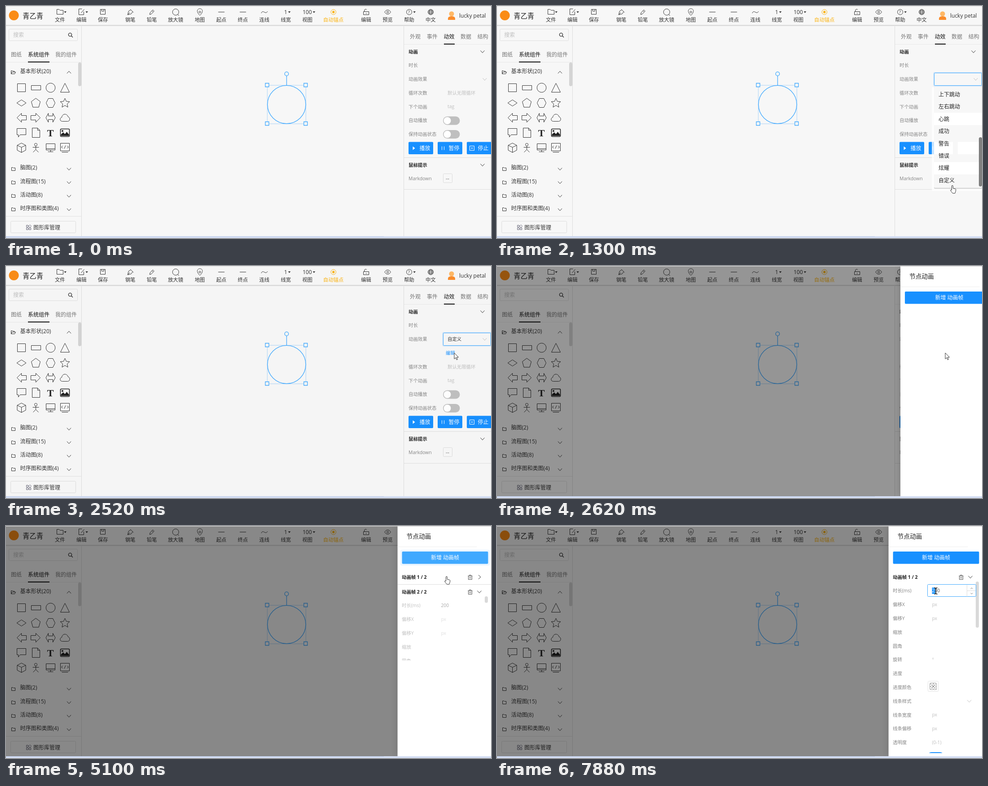
Recreate the animation shown at these times as an HTML page with a canvas. Size 1082x518 px, loop 8 s.

```html
<!DOCTYPE html>
<html lang="zh-CN">
<head>
<meta charset="utf-8">
<style>
html, body { margin: 0; width: 100%; height: 100%; overflow: hidden; background: #f7f7f7; }
canvas { display: block; }
</style>
</head>
<body>
<canvas id="stage" width="1082" height="518"></canvas>
<script>
const g = document.getElementById('stage').getContext('2d');
const LOOP = 8000, BG = '#f7f7f7', BLUE = '#1890ff', SKY = '#40a9ff', INK = '#333', GRAY = '#858585', PALE = '#bfbfbf';
const clamp = v => Math.min(1, Math.max(0, v));
const ramp = (t, start, length) => clamp((t - start) / length);
const smooth = v => v * v * (3 - 2 * v);

function text(s, x, cy, size = 12, color = INK, align = 'left', weight = 400) {
  g.font = `${weight} ${size}px "Open Sans", "Noto Sans CJK SC", "Noto Sans CJK", sans-serif`;
  g.textAlign = align;
  g.fillStyle = color;
  g.fillText(s, x, cy + size * 0.37);
}
function fill(x, y, w, h, color, r = 0) {
  g.fillStyle = color;
  g.beginPath();
  g.roundRect(x, y, w, h, r);
  g.fill();
}
function frame(x, y, w, h, color, r = 2, width = 1) {
  g.strokeStyle = color;
  g.lineWidth = width;
  g.beginPath();
  g.roundRect(x + 0.5, y + 0.5, w, h, r);
  g.stroke();
}
function disc(x, y, r, color) { fill(x - r, y - r, 2 * r, 2 * r, color, r); }
function icon(d, x, y, color = INK, width = 1, inside) {
  const path = new Path2D(d);
  g.save();
  g.translate(x, y);
  if (inside) { g.fillStyle = inside; g.fill(path); }
  if (width) { g.strokeStyle = color; g.lineWidth = width; g.stroke(path); }
  g.restore();
}
const ring = r => `M${r} 0A${r} ${r} 0 1 1 ${-r} 0A${r} ${r} 0 1 1 ${r} 0z`;
const DOWN = 'M-4.5-2.5L0 2.5 4.5-2.5', UP = 'M-4.5 2.5L0-2.5 4.5 2.5', RIGHT = 'M-2-4.5L3 0-2 4.5';
const FOLDER = 'M-4-3h3l1 1h4v6h-8z';
const caret = (x, y) => icon('M-2.5-1.5h5.5L0 2z', x, y, INK, 0, INK);

const tools = [
  ['文件', 120, 'M-7-6h5l2 2h7v9h-14z', 132],
  ['编辑', 168, 'M5-1v7h-11v-13h7M-1 2L6-6', 180],
  ['保存', 216, 'M-6-6h11v11h-11zM-3-6v4h5v-4'],
  ['钢笔', 277, 'M-6 6l2-8 5-3 4 4-3 5zM-6 6l5-5M0-6l7 7'],
  ['铅笔', 325, 'M-5 5.5l1-4 6-6.5 3 3-6.5 6.5zM0-3l3 3'],
  ['放大镜', 378, ring(7) + 'M4.5 5.5l3 2.5'],
  ['地图', 432, 'M0 7.5C-9-1-6-7.5 0-7.5S9-1 0 7.5z' + ring(2)],
  ['起点', 480, 'M-7 0H7'],
  ['终点', 528, 'M-7 0H7'],
  ['连线', 576, 'M-7 2.5C-3-7 2 7 7-1.5'],
  ['线宽', 624, '', 632, '1'],
  ['视图', 672, '', 687, '100'],
  ['自动锚点', 730, ring(5.7)],
  ['编辑', 803, 'M-6-1h12v7h-12zM-4-1v-3a3 3 0 0 1 5-1.5M0 2v2'],
  ['预览', 851, 'M-7 0Q0-10 7 0Q0 10-7 0z' + ring(2)],
  ['帮助', 899, ring(6), 911, '?'],
  ['中文', 947, ring(6) + 'M-6 0H6M0-6C-4-3-4 3 0 6C4 3 4-3 0-6M-5-3H5M-5 3H5'],
];
const shapes = [
  'M-9-9h18v18h-18z', 'M-10-5h21v10h-21z', ring(10.3), 'M0-10L10 10H-10z',
  'M0-7L10.5 0 0 7-10.5 0z', 'M0-10.5L10-3 6.5 9.5H-6.5L-10-3z', 'M-5-10H5L10 0 5 10H-5L-10 0z',
  'M0-10.5L3-3.5 10.5-3 5 2 6.5 9.5 0 5.5-6.5 9.5-5 2-10.5-3-3-3.5z',
  'M-10 0L0-10V-5H11V5H0V10z', 'M10 0L0-10V-5H-11V5H0V10z',
  'M-10.5 0L-5-10V-4H5V-10L10.5 0 5 10V4H-5V10z',
  'M-6 8C-12 8-12 0-7-1C-6-10 5-10 7-2C12-1 12 8 6 8z',
  'M-10-10h20v14h-13l-4 5v-5h-3z', 'M-8-11h12l5 5v16h-17zM4-11v5h5', '', '',
  'M0-10.5L9.5-5.5V5.5L0 10.5-9.5 5.5V-5.5zM-9.5-5.5L0-1 9.5-5.5M0-1V10.5',
  'M3-7A3 3 0 1 1-3-7A3 3 0 1 1 3-7M0-4V4L-6 10M0 4L6 10M-7-1H7',
  'M-10-9h20V5h-20zM-10 2h20M0 5v4M-6 9H6',
  'M-10-10h20V7h-20zM-5-4l-3 2.5 3 2.5M5-4l3 2.5-3 2.5M1.5-5l-3 7M-7 10H7',
];

function toolbar() {
  fill(0, 0, 1082, 43, BG);
  disc(17.5, 21, 11, '#fa8c16');
  text('青乙青', 37, 22, 15.4, '#222');
  for (const [label, x, d, arrow, value] of tools) {
    const color = label === '自动锚点' ? '#fbb415' : INK;
    icon(d, x + 0.5, 13.5, color);
    if (value) text(value, x, 13.5, value === '?' ? 9 : 12, INK, 'center');
    if (arrow) caret(arrow, 13.5);
    text(label, x + 0.3, 31, 11.4, color, 'center');
  }
  disc(730.5, 13.5, 2.7, '#fbb415');
  icon('M-8 9V6Q-8 1 0 1T8 6V9z', 994, 22, '', 0, '#fa8c2b');
  disc(994, 17.5, 5.5, '#ffb866');
  text('lucky petal', 1011, 21.5, 12);
  fill(0, 42, 1082, 1, '#e2e2e2');
  fill(0, 43, 1082, 1, '#d6d6d6');
  fill(0, 44, 1082, 1, '#e8e8e8');
  fill(0, 0, 1082, 1, '#e0e0e0');
}

function sidebar() {
  frame(6, 51, 153, 26, '#dedede');
  text('搜索', 16, 65, 12, PALE);
  icon(ring(3.6) + 'M2.7 2.7L6 6', 143, 64, INK, 1.4);
  text('图纸', 11, 108.5, 12, '#777');
  text('系统组件', 49, 108.5, 12, '#111');
  text('我的组件', 110, 108.5, 12, '#777');
  fill(0, 125, 168, 1, '#e8e8e8');
  fill(49, 124, 48, 2, '#111');
  fill(161, 126, 7, 53, '#d4d4d4', 3.5);
  icon('M-4 4V-3h3l1 1h3v2M-4 4L-2 0H6L4 4z', 15.5, 147.5);
  text('基本形状(20)', 31.5, 146);
  icon(UP, 140.5, 148);
  shapes.forEach((d, i) => icon(d, Math.floor(34.5 + i % 4 * 32.3) + 0.5, Math.floor(182.5 + (i >> 2) * 33.5) + 0.5));
  g.font = 'bold 22px "Liberation Serif", serif';
  g.fillStyle = '#222';
  g.textAlign = 'center';
  g.fillText('T', 99, 290.5);
  frame(121, 274, 20, 17, '#222', 2, 1.6);
  icon('M-9 7V4L-4-1 0 3 4-2 9 4V7z', 131.5, 283, '', 0, '#222');
  disc(126, 279, 2, '#222');
  ['脑图(2)', '流程图(15)', '活动图(8)', '时序图和类图(4)'].forEach((label, i) => {
    const y = 361 + i * 30.2;
    icon(FOLDER, 16.5, Math.floor(y) + 2.5);
    text(label, 31.5, y);
    icon(DOWN, 140.5, y + 3);
  });
  fill(0, 469, 168, 1, '#e2e2e2');
  frame(10, 480, 145, 26, '#dcdcdc');
  icon('M-5-5h4v4h-4zM-5 1h4v4h-4zM1 1h4v4h-4zM3-6l3 3-3 3-3-3z', 50.5, 494.5, '#667');
  text('图形库管理', 61, 495);
  fill(168, 44, 1, 470, '#dcdcdc');
}

function selection() {
  frame(582.5, 176.5, 86, 86, '#a9d3f8', 0);
  icon(ring(42.7), 626, 220, SKY, 1.3);
  icon('M0 0V-21', 626, 177, SKY, 1.3);
  icon(ring(4.3), 626, 151.5, SKY, 1.3, BG);
  for (const x of [582.5, 668.5]) for (const y of [176.5, 262.5]) icon('M-4-4h8v8h-8z', x, y, SKY, 1.3, BG);
}

function toggle(y) {
  fill(975, y - 9.5, 37.5, 19, PALE, 9.5);
  disc(984.5, y, 8, '#fff');
}

function properties(t) {
  const custom = t >= 1690, dy = custom ? 31 : 0;
  fill(887, 44, 1, 470, '#dcdcdc');
  ['外观', '事件', '动效', '数据', '结构'].forEach((s, i) => text(s, 901 + i * 37.7, 69, 12, i === 2 ? '#111' : '#777'));
  fill(888, 85, 194, 1, '#e8e8e8');
  fill(977, 84, 24, 2, '#111');
  text('动画', 898, 102, 10.4, '#222', 'left', 700);
  icon(DOWN, 1063, 102);
  text('时长', 898, 132, 10.4, GRAY);
  text('动画效果', 898, 163, 10.4, GRAY);
  if (t >= 220) {
    if (t >= 400) frame(974, 148, 109, 30, 'rgba(24,144,255,.18)', 2, 2);
    frame(975, 149, 106, 28, SKY);
  }
  icon(DOWN, 1068, 163.5, PALE);
  if (custom) {
    text('自定义', 985, 163, 10.4);
    text('编辑', 981, 194, 10.4, BLUE);
  }
  g.save();
  g.translate(0, dy);
  ['循环次数', '下个动画', '自动播放', '保持动画状态'].forEach((s, i) => text(s, 898, 194 + i * 30.8, 10.4, GRAY));
  text('默认无限循环', 985, 194, 10.4, PALE);
  text('tag', 985, 224.5, 10.4, PALE);
  toggle(256);
  toggle(286.5);
  const marks = ['M-2-4L3 0-2 4z', 'M-2-4V4M3-4V4', 'M-5-5H5V5H-5zM-2-2L2 2M2-2L-2 2'];
  ['播放', '暂停', '停止'].forEach((s, i) => {
    const x = 898 + i * 65;
    fill(x, 303.5, 55, 27.5, BLUE, 2);
    icon(marks[i], x + 11.5, 317.5, '#fff', i ? 1 : 0, i ? '' : '#fff');
    text(s, x + 24.5, 317.5, 12, '#fff');
  });
  fill(888, 338, 194, 1, '#dedede');
  text('鼠标提示', 898, 355, 10.4, '#222', 'left', 700);
  icon(DOWN, 1063, 355);
  text('Markdown', 898, 385, 10.4, GRAY);
  frame(975, 374, 20, 20, '#dcdcdc');
  text('...', 985, 383, 10, INK, 'center');
  fill(888, 409, 194, 1, '#dedede');
  g.restore();
}

const effects = ['无', '上下跳动', '左右跳动', '心跳', '成功', '警告', '错误', '炫耀', '自定义'];
function dropdown(t) {
  const alpha = ramp(t, 430, 170) - ramp(t, 1680, 120);
  if (alpha <= 0) return;
  const scroll = smooth(ramp(t, 910, 200));
  g.save();
  g.globalAlpha = alpha;
  fill(970, 181, 112, 232, 'rgba(255,255,255,.75)', 3);
  fill(975, 180, 107, 228, '#d2d2d2', 2);
  fill(975, 180, 107, 226, BG, 2);
  g.beginPath();
  g.rect(975, 182, 107, 224);
  g.clip();
  fill(975, 238.5, 107, 27.5, '#fff');
  fill(975, 348.5, 107, 27.5, '#fff');
  fill(975, 303.5, 42, 27.5, '#fff');
  fill(1028, 303.5, 47, 27.5, '#fff');
  effects.forEach((s, i) => text(s, 985, 197.5 + (i - scroll) * 27.4, 12, '#222'));
  fill(1075, 184 + 109 * scroll, 7, 110, '#7f7f7f', 3.5);
  g.restore();
}

const settings = [['时长(ms)', '200'], ['偏移X', 'px'], ['偏移Y', 'px'], ['缩放'], ['圆角'], ['旋转', '°'],
  ['进度'], ['进度颜色'], ['线条样式'], ['线条宽度', 'px'], ['线条偏移', 'px'], ['透明度', '(0-1)']];

function stepHeader(y, index, count, open) {
  text(`动画帧 ${index} / ${count}`, 883, y, 10.4, '#222', 'left', 700);
  icon('M-5-3H5M-2-3v-2h4v2M-4-3v8h8v-8M-1.3-1V3M1.3-1V3', 1035.5, y + 0.5, '#555');
  icon(open ? DOWN : RIGHT, 1056, y);
  if (!open) fill(874, y + 16, 208, 1, '#dedede');
}

function stepBody(top, p, t) {
  const height = 383 * p;
  g.save();
  g.beginPath();
  g.rect(874, top, 208, height);
  g.clip();
  fill(1068, top, 7, height * height / 1424, '#d9d9d9', 3.5);
  g.globalAlpha = Math.min(1, p * 1.35);
  settings.forEach(([label, value], i) => {
    const y = top + 20.5 + i * 30.8;
    text(label, 883, y, 10.4, GRAY);
    if (value) text(value, 970.5, y, 10.2, i ? PALE : '#555');
  });
  const swatch = top + 234;
  frame(961, swatch - 12, 23, 23, '#e2e2e2');
  frame(965, swatch - 8, 15, 15, '#aaa', 2);
  for (let i = 0; i < 25; i += 2) fill(966 + i % 5 * 3, swatch - 7 + Math.floor(i / 5) * 3, 3, 3, '#c4c4c4');
  icon('M-2-2L2 2M2-2L-2 2', 973, swatch, '#777');
  icon(DOWN, 1053.5, top + 267, PALE);
  fill(960, top + 381, 37.5, 19, BLUE, 9.5);
  if (t >= 6700) {
    frame(960, top + 6, 108, 27, SKY);
    icon('M0-13V13M0 0H19', 1048.5, top + 20.5, '#dcdcdc');
    icon('M-2.5 1.5L0-1 2.5 1.5', 1059, top + 15, GRAY);
    icon('M-2.5-1.5L0 1 2.5-1.5', 1059, top + 27, GRAY);
  }
  if (t >= 7850) {
    fill(970.5, top + 13.5, 7, 14, BLUE);
    text('2', 970.5, top + 20.5, 10.2, '#fff');
  }
  g.restore();
}

function drawer(t) {
  if (t < 2520) return;
  const p = 1 - (1 - ramp(t, 2520, 194)) ** 3;
  fill(0, 1, 1082, 513, `rgba(0,0,0,${0.45 * p})`);
  g.save();
  g.translate(240 * (1 - p), 0);
  g.shadowColor = 'rgba(0,0,0,.2)';
  g.shadowBlur = 14;
  fill(873.5, 1, 240, 513, '#fff');
  g.shadowBlur = 0;
  text('节点动画', 893.5, 23, 13.7, '#222');
  fill(873.5, 46, 177, 1, '#f0f0f0');

  // The list's scrollbar narrows the button once the second step exists.
  const width = t < 4790 ? 198 : 192;
  for (const click of [3380, 4770]) {
    const w = ramp(t, click, 450);
    if (w > 0 && w < 1) {
      const spread = 1 + 4 * w;
      fill(883.5 - spread, 57 - spread, width + 2 * spread, 27.5 + 2 * spread, `rgba(24,144,255,${0.3 * (1 - w)})`, 4);
    }
  }
  fill(883.5, 57, width, 27.5, t >= 3170 && t < 6160 ? SKY : BLUE, 2);
  text('新增 动画帧', 883.5 + width / 2, 71, 12, '#fff', 'center');

  const first = t >= 6165, second = t >= 5018;
  if (t >= 3380) stepHeader(114, 1, t < 4790 ? 1 : 2, first);
  if (first) stepBody(124, smooth(ramp(t, 6165, 200)), t);
  else if (t >= 4790) {
    stepHeader(147, 2, 2, second);
    if (second) stepBody(157, smooth(ramp(t, 5018, 200)), t);
  }
  g.restore();
}

const pointers = {
  arrow: 'M0 0V13.5L3.2 10.6 5.3 15.5 7.4 14.6 5.3 9.8H9.5z',
  hand: 'M3.5 11V2a1.4 1.4 0 0 1 2.8 0V7l5 1.2q1.7.5 1.5 2.2L12 14.5l-1.3 3.7H5.7L1 12.5q-1-2 1-2z',
  beam: 'M-3.5-7Q0-7 0-5Q0-7 3.5-7M0-5.5V5.5M-3.5 7Q0 7 0 5Q0 7 3.5 7',
};
const route = [
  [70, 1068, 152, 'hand'], [400, 1020, 158], [830, 1016, 380], [1300, 1011, 400], [1450, 1011, 400], [1510, 1006, 380],
  [1680, 1006, 380, 'arrow'], [2140, 1000, 194], [2800, 1000, 194], [3070, 984, 73, 'hand'], [3230, 981, 71],
  [3640, 981, 71], [3920, 985, 122], [4100, 985, 122], [4470, 990, 61], [4620, 988, 61], [4770, 988, 61],
  [5080, 978, 112], [5300, 978, 112], [5570, 957, 111], [5780, 955, 110], [5950, 957, 112], [6160, 957, 112],
  [6300, 958, 119], [6500, 958, 119], [6600, 985, 150, 'beam'], [6900, 990, 178], [7340, 984, 145], [7400, 984, 145],
  [7480, 970, 145], [7820, 970, 145], [7880, 979, 145], [LOOP, 979, 145],
];
function pointer(t) {
  if (t < route[0][0]) return;
  const i = route.findIndex(k => k[0] > t) - 1;
  const [t0, x0, y0] = route[i], [t1, x1, y1] = route[i + 1];
  const kind = route.slice(0, i + 1).findLast(k => k[3])[3];
  const p = (t - t0) / (t1 - t0);
  const beam = kind === 'beam';
  icon(pointers[kind], x0 + (x1 - x0) * p, y0 + (y1 - y0) * p, beam ? '#111' : '#333', beam ? 1.4 : 1, beam ? '' : '#fff');
}

const start = performance.now();
function draw() {
  const t = (performance.now() - start) % LOOP;
  fill(0, 0, 1082, 518, BG);
  sidebar();
  selection();
  properties(t);
  toolbar();
  dropdown(t);
  drawer(t);
  fill(0, 514, 1082, 4, '#d5dff5');
  fill(0, 514, 843, 1, '#bccbe8');
  pointer(t);
  requestAnimationFrame(draw);
}
draw();
</script>
</body>
</html>
```
